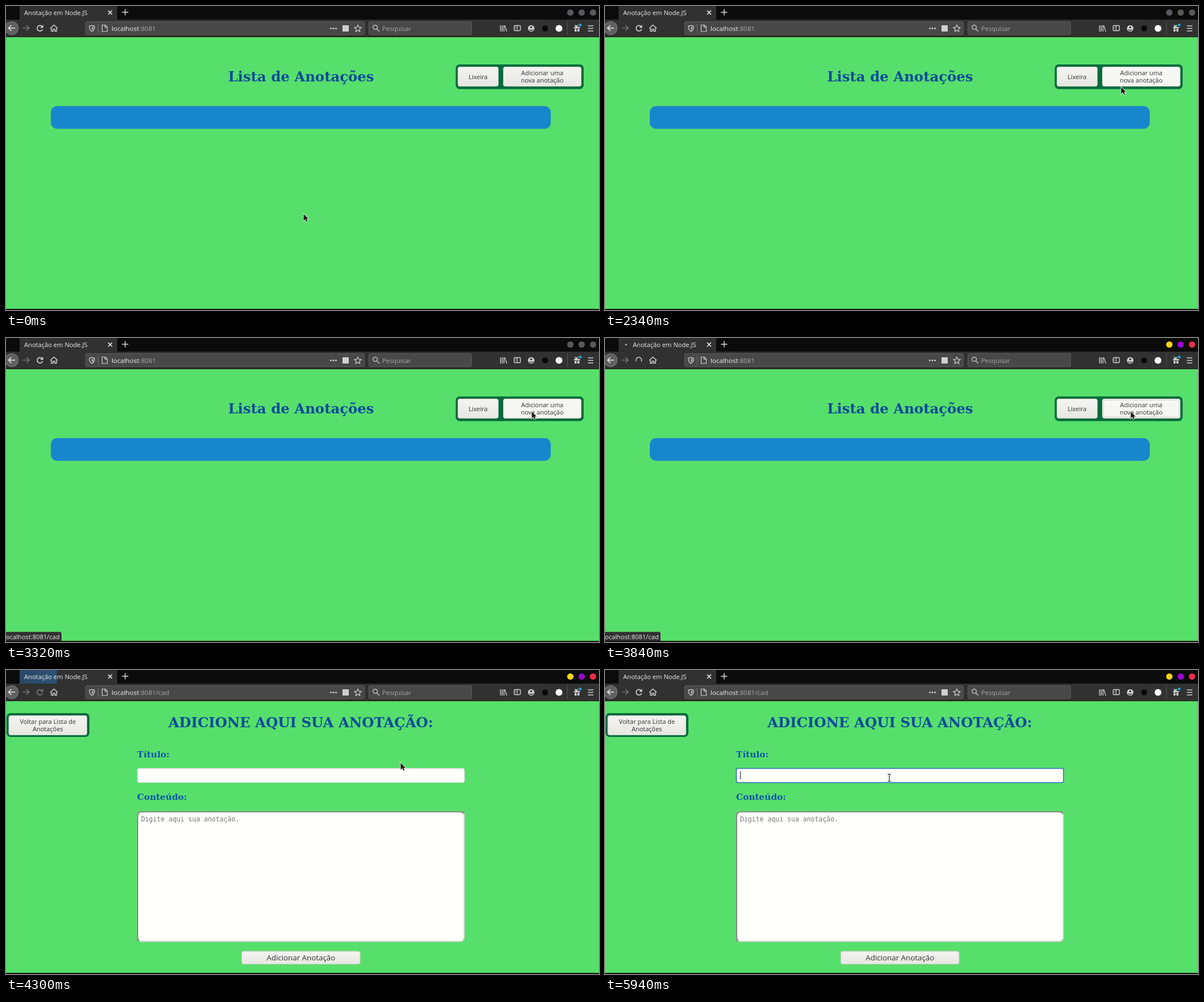
Recreate the animation shown at these times as an HTML page with a canvas. Size 1045x536 px, loop 8000 ms.

```html
<!DOCTYPE html>
<html lang="pt-BR">
<head>
<meta charset="utf-8">
<title>Anotação em Node.JS</title>
<style>
html, body { margin: 0; width: 100%; height: 100%; overflow: hidden; background: #000; }
canvas { display: block; }
</style>
</head>
<body>
<canvas id="stage" width="1045" height="536"></canvas>
<script>
const ctx = document.getElementById('stage').getContext('2d');
const LOOP = 8000;
const HOVER = 2340, STATUS = 3160, CLICK = 3560, LOAD = 3760, PAGE = 3880, DONE = 4200, FOCUS = 5800, READY = 5940;
const SANS = '"Open Sans", sans-serif', SERIF = '"DejaVu Serif", serif', MONO = '"DejaVu Sans Mono", monospace';
const GREEN = '#57df6b', FRAME = '#046c3d', ICON = '#d0d1d0', BAR = '#303130';

// Pointer positions: time, x, y
const pointer = [
  [0, 524, 366], [500, 671, 306], [800, 754, 270], [1080, 804, 242], [1360, 865, 193],
  [1640, 885, 169], [1920, 896, 151], [2200, 909, 142], [2480, 920, 132], [2760, 926, 129],
  [4020, 868, 139], [4160, 765, 154], [4300, 695, 163], [4440, 634, 169], [4580, 588, 175],
  [4720, 559, 181], [4860, 535, 182], [5000, 519, 183], [5240, 508, 183], [5520, 501, 190]
];

function text(str, x, y, size, color, { font = SANS, align = 'left', weight = 400 } = {}) {
  ctx.font = `${weight} ${size}px ${font}`;
  ctx.textAlign = align;
  ctx.fillStyle = color;
  ctx.fillText(str, x, y);
}

function box(x, y, w, h, r, fill, stroke, width = 1) {
  ctx.beginPath();
  ctx.roundRect(x, y, w, h, r);
  if (fill) { ctx.fillStyle = fill; ctx.fill(); }
  if (stroke) { ctx.strokeStyle = stroke; ctx.lineWidth = width; ctx.stroke(); }
}

function dot(x, y, r, color) {
  ctx.beginPath();
  ctx.arc(x, y, r, 0, Math.PI * 2);
  ctx.fillStyle = color;
  ctx.fill();
}

function line(d, color = ICON, width = 1.5) {
  ctx.strokeStyle = color;
  ctx.lineWidth = width;
  ctx.stroke(new Path2D(d));
}

function fill(d, color = ICON) {
  ctx.fillStyle = color;
  ctx.fill(new Path2D(d));
}

function button(x, y, w, h, lines, { hover = false, size = 11 } = {}) {
  const shade = ctx.createLinearGradient(0, y, 0, y + h);
  shade.addColorStop(0, hover ? '#f8f8f4' : '#f4f4f1');
  shade.addColorStop(1, hover ? '#f5f5f0' : '#e7e7e2');
  box(x + .5, y + .5, w - 1, h - 1, 3, shade, '#cfcec8');
  const first = y + h / 2 + size * .38 - (lines.length - 1) * 6.5;
  lines.forEach((s, i) => text(s, x + w / 2, first + i * 13, size, '#2f3436', { align: 'center' }));
}

function reloadIcon(t) {
  if (t >= LOAD && t < PAGE) return line('M55 41A5 5 0 1 1 64 41.500');
  if (t >= PAGE && t < 4000) return line('M54.500 36L56 35M58 34.500Q61 35 62 38', '#a5a6a5', 1.2);
  if (t >= 4000 && t < DONE) return line('M55.500 34.500L64.500 43.500M64.500 34.500L55.500 43.500');
  const color = t >= DONE && t < READY ? '#737473' : ICON;
  line('M63.500 36A4.900 4.900 0 1 0 64.500 41', color, 1.7);
  fill('M65.500 33V38.500H60Z', color);
}

function tabs(t) {
  ctx.fillStyle = '#0a0b0a';
  ctx.fillRect(0, 0, 1045, 24);
  ctx.fillStyle = BAR;
  ctx.fillRect(24, 0, 172, 24);
  if (t >= DONE && t < 5240) {
    const reach = Math.min(172, (t - DONE) * .65);
    ctx.globalAlpha = Math.min(1, (5240 - t) / 800);
    const glow = ctx.createLinearGradient(24, 0, 24 + reach, 0);
    glow.addColorStop(0, '#2b4866');
    glow.addColorStop(1, '#2d5274');
    ctx.fillStyle = glow;
    ctx.fillRect(24, 0, reach, 24);
    ctx.globalAlpha = 1;
  }
  const loading = t >= LOAD && t < DONE;
  if (loading) dot(37 + 6 * Math.sin((t - 3840) / 160), 11.5, 1.6, '#b5b6b5');
  const title = t >= PAGE && t < DONE ? 'localhost:8081/cad' : 'Anotação em Node.JS';
  text(title, loading ? 49 : 32, 15.5, 11.15, '#ecedec');
  line('M180 8L187 15M187 8L180 15', '#eee', 1.6);
  line('M204.500 11H215.500M210 5.500V16.500', '#ddd', 1.5);
  const active = t >= CLICK;
  ['#f6d415', '#9b02d4', '#ed2d4d'].forEach((c, i) => dot(994.5 + i * 20, 11.5, 5.6, active ? c : '#59595d'));
}

function toolbar(t) {
  ctx.fillStyle = BAR;
  ctx.fillRect(0, 24, 1045, 31);
  ctx.fillStyle = '#1c1e1c';
  ctx.fillRect(0, 54, 1045, 1);

  dot(10, 39, 12, '#7d7e7d');
  dot(10, 39, 11, '#5f605f');
  line('M16 39H5M9.500 34L4.500 39L9.500 44', '#e6e7e6', 1.6);
  line('M29.500 39H40.500M36 34L41 39L36 44', '#737473', 1.6);
  reloadIcon(t);
  line('M78 39.500L84.500 33.500L91 39.500M80 39V44.500H83V41H86V44.500H89V39', ICON, 1.5);

  box(140.5, 27.5, 491, 23, 2, '#474847', '#5b5c5b');
  line('M151.500 34Q153.500 35.500 156 35.500Q156.500 42 151.500 45Q146.500 42 147 35.500Q149.500 35.500 151.500 34Z', ICON, 1.3);
  fill('M151.500 36.500L154 37.500Q154 41 151.500 42.500Z');
  line('M162.500 32V47', '#6b6c6b', 1);
  line('M169.500 33.500H175L178.500 37V45H169.500ZM174.500 34V37.500H178', ICON, 1.2);
  const host = 'localhost';
  text(host, 186, 43.5, 11.6, '#f0f0ef');
  const hostWidth = ctx.measureText(host).width;
  text(t >= PAGE ? ':8081/cad' : ':8081', 186 + hostWidth, 43.5, 11.6, '#a7a8a7');
  [572.5, 577, 581.5].forEach(x => dot(x, 39.5, 1.5, ICON));
  box(593, 34, 11, 11, 0, ICON);
  line('M620 33.500L621.800 37.400L626 37.900L622.900 40.800L623.700 45L620 42.900L616.300 45L617.100 40.800L614 37.900L618.200 37.400Z', ICON, 1.2);

  box(639.5, 27.5, 181, 23, 2, '#474847', '#5b5c5b');
  line('M654.500 37.500A3.800 3.800 0 1 1 646.900 37.500A3.800 3.800 0 1 1 654.500 37.500M653.500 40.500L658 45', '#bcbdbc', 1.5);
  text('Pesquisar', 663, 43.5, 11.2, '#a7a8a7');

  line('M871.500 34V45M874.500 34V45M877.500 34V45M879 34.500L882.500 45', ICON, 1.4);
  box(895.5, 34.5, 11, 9, 1.5, null, ICON, 1.4);
  line('M901 34.500V43.500M897.500 37H899.500M897.500 39.500H899.500', ICON, 1.1);
  dot(925.5, 39.5, 5.7, ICON);
  dot(925.5, 37.5, 1.8, BAR);
  line('M922 41.500Q925.500 44.500 929 41.500', BAR, 1.6);
  dot(950, 39.5, 5.2, '#080908');
  dot(974.5, 39.5, 6, '#f7f7f7');
  line('M989.500 27V51', '#535453', 1);
  fill('M1001 37H1011.500V39.500H1001ZM1002 40.500H1005.500V45H1002ZM1007 40.500H1010.500V45H1007Z');
  line('M1006.200 37Q1002 36 1003.200 34Q1005 33 1006.200 37Q1007.500 33 1009 34', ICON, 1.2);
  dot(1012, 33.5, 2.4, '#18a8dc');
  line('M1025.500 35H1035M1025.500 39.500H1035M1025.500 44H1035', ICON, 1.5);
}

function listPage(t) {
  text('Lista de Anotações', 520, 132.5, 24.4, '#0b4b9c', { font: SERIF, align: 'center', weight: 700 });
  box(792.5, 103, 225.5, 43.5, 7, FRAME);
  button(796, 107, 72, 35, ['Lixeira']);
  button(876, 107, 138, 35, ['Adicionar uma', 'nova anotação'], { hover: t >= HOVER });
  if (t >= CLICK) {
    ctx.setLineDash([1, 1]);
    box(878.5, 109.5, 133, 30, 2, null, '#a9aaa6');
    ctx.setLineDash([]);
  }
  box(79, 176.5, 881, 40, 11, '#1787cd');
}

function formPage(t) {
  const label = { font: SERIF, weight: 700 };
  box(1, 76, 146, 42, 7, FRAME);
  button(4.5, 80, 138.5, 35, ['Voltar para Lista de', 'Anotações']);
  text('ADICIONE AQUI SUA ANOTAÇÃO:', 519.5, 101.3, 24.4, '#0b4b9c', { ...label, align: 'center' });
  text('Título:', 231, 154, 15.3, '#0c55ac', label);
  text('Conteúdo:', 231, 229, 15.3, '#0c55ac', label);

  const focused = t >= FOCUS;
  box(231.5, 173.5, 576.5, 25, 3, '#fffffb', focused ? '#2b6cc4' : '#cbd0c8', focused ? 1.5 : 1);
  if (focused) line('M238.500 179V192.500', '#111', 1);

  box(231, 249, 577.5, 230.5, 8, '#d3d8d0');
  fill('M231 479V257Q231 249 239 249H800Q808 249 808 252L806 253H236V476Z', '#858b83');
  box(233, 251, 573.5, 226.5, 6, '#fffffb');
  text('Digite aqui sua anotação.', 238, 266.5, 11.5, '#777', { font: MONO });
  button(415, 495.5, 209.5, 23.5, ['Adicionar Anotação'], { size: 13.35 });
}

function statusBar(t) {
  if (t < STATUS || t >= DONE) return;
  const onForm = t >= PAGE;
  ctx.globalAlpha = Math.min(1, .6 + (t - STATUS) / 250);
  box(-3.5, 518.5, onForm ? 245 : 101, 18, 2, '#303130', '#4b4c4b');
  text(onForm ? 'localhost' : 'localhost:8081/cad', -3, 531, 11.15, '#f0f0ef');
  ctx.globalAlpha = 1;
}

function cursor(t) {
  const [, x, y] = pointer.findLast(p => p[0] <= t);
  ctx.save();
  ctx.translate(x, y);
  if (t >= 4720) {
    const beam = 'M-3 -6.500H-1L0 -5.500L1 -6.500H3M0 -5.500V5.500M-3 6.500H-1L0 5.500L1 6.500H3';
    line(beam, '#fff', 2.5);
    line(beam, '#222', 1.2);
  } else {
    const arrow = 'M.500 .700V12.700L3.300 10.100L5.200 14.300L7.200 13.400L5.400 9.400H9Z';
    line(arrow, '#e8eee8', 1.6);
    fill(arrow, '#1a1d1a');
  }
  ctx.restore();
}

function draw(t) {
  ctx.fillStyle = GREEN;
  ctx.fillRect(0, 55, 1045, 479);
  (t < PAGE ? listPage : formPage)(t);
  statusBar(t);
  ctx.fillStyle = '#101410';
  ctx.fillRect(0, 534, 1045, 2);
  tabs(t);
  toolbar(t);
  cursor(t);
}

const start = performance.now();
function tick() {
  draw((performance.now() - start) % LOOP);
  requestAnimationFrame(tick);
}
tick();
</script>
</body>
</html>
```
